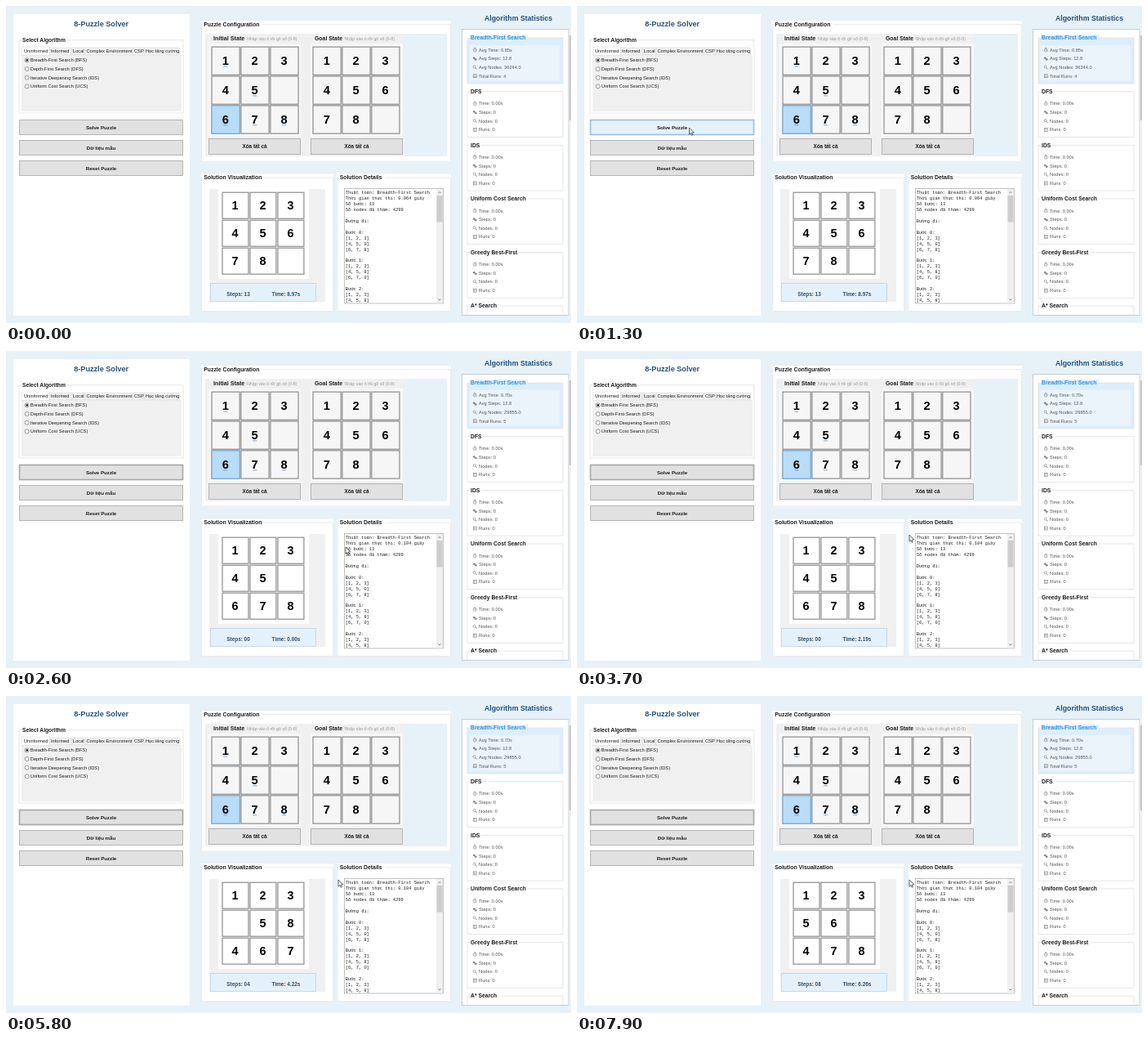
Write an HTML page that moves like this. It is 692 px wide and 388 px high and loops after 8000 ms.

```html
<!DOCTYPE html>
<html lang="vi">
<head>
<meta charset="utf-8">
<title>8-Puzzle Solver</title>
<style>
html, body { margin: 0; width: 100%; height: 100%; overflow: hidden; background: #e6f1f8; }
svg { display: block; width: 100%; height: 100%; }
text { font-family: "Liberation Sans", Arial, sans-serif; white-space: pre; }
.mono { font-family: "Liberation Mono", monospace; }
</style>
</head>
<body>
<svg id="stage" viewBox="0 0 692 388"></svg>
<script>
const LOOP = 8000;
const stage = document.getElementById('stage');
const PALE = '#e6f1f8', GREY = '#f0f0f0', NAVY = '#24507c', INK = '#1c1c1c';

function add(tag, attrs, parent = stage) {
  const el = document.createElementNS('http://www.w3.org/2000/svg', tag);
  set(el, attrs);
  parent.appendChild(el);
  return el;
}
function set(el, attrs) {
  for (const k in attrs) el.setAttribute(k, attrs[k]);
}
function rect(x, y, r, b, fill, stroke = 'none', w = 1, parent = stage) {
  return add('rect', { x, y, width: r - x, height: b - y, fill, stroke, 'stroke-width': w }, parent);
}
function label(str, x, y, size, fill = INK, more = {}) {
  const el = add('text', { x, y, 'font-size': size, fill, ...more });
  el.textContent = str;
  return el;
}
const bold = { 'font-weight': 700 };
const mid = { 'text-anchor': 'middle' };
const boldMid = { ...bold, ...mid };

// Group box with a title that interrupts its top border
function group(title, x, y, r, b, size, titleW, color = INK, fill = '#fff') {
  rect(x, y, r, b, fill, '#dcdcdc', .7);
  rect(x + 3, y - 4, x + 5 + titleW, y + 4, fill);
  label(title, x + 4, y + 2.3, size, color, bold);
}

// White panel whose border line runs at mid-height of the title
function panel(title, x, y, r, b, titleW) {
  rect(x, y, r, b, '#fff');
  rect(x + .5, y + 4.5, r - .5, b - .5, 'none', '#e4e7e9', .8);
  rect(x + 2, y, x + 5 + titleW, y + 8, '#fff');
  label(title, x + 3.2, y + 6.6, 6.87, INK, bold);
}

function grid(xs, ys, side, size, fill, digits) {
  const h = side / 2;
  return digits.map((d, i) => {
    const x = xs[i % 3], y = ys[i / 3 | 0];
    rect(x + .4 - h, y - h, x + .4 + h, y + h, fill, '#8d8d8d', 1.2);
    return label(d || '', x, y + size * .35, size, '#000', boldMid);
  });
}

function button(str, x, y, r, b, size = 6.15) {
  const box = rect(x, y, r, b, '#e1e1e1', '#b4b4b4', 1);
  label(str, (x + r) / 2, (y + b) / 2 + 2.2, size, INK, boldMid);
  return box;
}

// Left panel
rect(9, 10, 225, 379, '#fff');
label('8-Puzzle Solver', 116.7, 25.4, 9.15, NAVY, boldMid);
group('Select Algorithm', 16, 41.8, 217, 131, 6.7, 54);
rect(19, 60, 215, 129, GREY);
rect(19.5, 50, 53.5, 60.5, '#fff', '#d9d9d9', .6);
const tabs = [['Uninformed', 22, 52], ['Informed', 55, 78.5], ['Local', 82, 95.5],
  ['Complex Environment', 98.5, 153.5], ['CSP', 157, 167.5], ['Học tăng cường', 171, 211]];
tabs.forEach(([t, x, r], i) => {
  if (i) rect(x - 1.5, 51, r + 1.5, 60, GREY, '#d9d9d9', .6);
  label(t, x, 57.3, 5.7);
});
['Breadth-First Search (BFS)', 'Depth-First Search (DFS)', 'Iterative Deepening Search (IDS)',
  'Uniform Cost Search (UCS)'].forEach((t, i) => {
  const y = 66.4 + i * 10.65;
  add('circle', { cx: 25.7, cy: y, r: 2.5, fill: '#fff', stroke: '#555', 'stroke-width': .6 });
  if (!i) add('circle', { cx: 25.7, cy: y, r: 1.3, fill: '#222' });
  label(t, 29.8, y + 2, 5.72);
});
const solveBtn = button('Solve Puzzle', 16.5, 139.5, 216.5, 157.5);
const sampleBtn = button('Dữ liệu mẫu', 16.5, 164.5, 216.5, 182.5);
button('Reset Puzzle', 16.5, 189.5, 216.5, 207.5);

// Puzzle configuration
panel('Puzzle Configuration', 239, 18, 545, 190.5, 70);
rect(244, 34, 540, 184, PALE);
rect(244, 34, 486, 184, GREY);
[['Initial State', 254, 295, 248], ['Goal State', 378, 414.5, 373]].forEach(([t, x, hintX, left]) => {
  rect(left, 46, left + 113, 160, '#f7f7f7');
  label(t, x, 41.7, x < 300 ? 7.2 : 6.9, INK, bold);
  label('Nhập vào ô rồi gõ số (0-8)', hintX, 41.8, 5.3, '#9a9a9a');
  button('Xóa tất cả', left + .5, 162.5, left + 112.5, 181.5, 6.4);
});
const rows = [67.2, 103.1, 139], initX = [268.7, 304.6, 340.6];
grid(initX, rows, 34.2, 14.6, '#f6f6f6', [1, 2, 3, 4, 5, 0, 6, 7, 8]);
grid([392.7, 428.6, 464.5], rows, 34.2, 14.6, '#f6f6f6', [1, 2, 3, 4, 5, 6, 7, 8, 0]);
rect(252, 121.9, 286.2, 156.1, '#b9dcf8', '#78aedb', 1.2);
label('6', initX[0], 144.1, 14.6, '#000', boldMid);
[[0, 0], [1, 1], [0, 2], [1, 2], [2, 2]].forEach(([c, r]) =>
  rect(initX[c] - 2.5, rows[r] + 6.4, initX[c] + 2.5, rows[r] + 7.2, '#5b9bd5'));

// Solution visualization
panel('Solution Visualization', 239, 205.5, 401, 374, 72);
rect(249, 224, 391, 362, GREY);
rect(260, 224, 371, 334, '#fff');
const tiles = grid([280.6, 314.5, 348.5], [244.2, 278.2, 312.2], 32, 14.4, '#fff', Array(9).fill(0));
rect(250.5, 339.5, 379.5, 361.5, '#e2f1fc', '#bdd3e5', .8);
rect(268, 347, 302, 358.5, '#eaf0f4');
rect(324, 347, 363, 358.5, '#eaf0f4');
const stepText = label('', 270.3, 354.9, 6.4, NAVY, bold);
const timeText = label('', 325.6, 354.9, 6.4, NAVY, bold);

// Solution details
panel('Solution Details', 405.5, 205.5, 545, 374, 54);
rect(414.5, 223.5, 535.5, 364, '#fff', '#a5a5a5', .7);
rect(527, 224, 535, 363.6, GREY);
rect(527.5, 232, 534.5, 264.5, '#cdcdcd');
for (const [y, d] of [[229, -1.6], [358.5, 1.6]])
  add('path', { d: `M529.4 ${y} l1.6 ${d} l1.6 ${-d}`, fill: 'none', stroke: '#666', 'stroke-width': .8 });
const log = ['Thuật toán: Breadth-First Search', '', 'Số bước: 13', 'Số nodes đã thăm: 4299', '', 'Đường đi:', '',
  'Bước 0:', '[1, 2, 3]', '[4, 5, 0]', '[6, 7, 8]', '', 'Bước 1:', '[1, 2, 3]', '[4, 5, 8]', '[6, 7, 0]', '',
  'Bước 2:', '[1, 2, 3]', '[4, 5, 8]'];
const logLines = log.map((t, i) => label(t, 415.8, 230.3 + i * 6.92, 5.38, INK, { class: 'mono' }));

// Statistics
label('Algorithm Statistics', 627.5, 18.4, 8.8, NAVY, boldMid);
rect(558.5, 28.5, 689, 378.5, '#fff', '#bcc4ca', .8);
rect(689.6, 28, 692, 379, GREY);
rect(689.8, 36, 692, 140, '#c8c8c8');
const clip = add('clipPath', { id: 'list' });
rect(558, 28, 690, 378, '#fff', 'none', 0, clip);

function icon(kind, x, y) {
  const g = add('g', { fill: 'none', stroke: '#777', 'stroke-width': .6 });
  if (kind === 0) {
    add('circle', { cx: x, cy: y + .3, r: 2 }, g);
    add('path', { d: `M${x} ${y - 1} v1.4 h1 M${x - .8} ${y - 2.4} h1.6` }, g);
  } else if (kind === 1) {
    add('ellipse', { cx: x - 1, cy: y - .6, rx: 1.2, ry: .9, fill: '#888' }, g);
    add('ellipse', { cx: x + 1, cy: y + 1.1, rx: 1.2, ry: .9, fill: '#888' }, g);
  } else if (kind === 2) {
    add('circle', { cx: x - .6, cy: y - .6, r: 1.5 }, g);
    add('path', { d: `M${x + .5} ${y + .5} l1.8 1.8`, 'stroke-width': .9 }, g);
  } else {
    rect(x - 2, y - 1.9, x + 2, y + 2.1, 'none', '#777', .6, g);
    add('path', { d: `M${x - 1} ${y - .6} h2 M${x - 1} ${y + .8} h2` }, g);
  }
}

const bfsLines = [];
[['Breadth-First Search', 69], ['DFS', 14], ['IDS', 12], ['Uniform Cost Search', 68], ['Greedy Best-First', 58]]
  .forEach(([t, w], i) => {
    const y = 39.1 + i * 65.6;
    group(t, 565, y, 682, y + 55.8, 6.83, w, i ? INK : '#2d8fe0', i ? '#fff' : '#dceefb');
    if (!i) rect(567.5, 48, 678, 91.5, '#ebf4fb');
    ['Time: 0.00s', 'Steps: 0', 'Nodes: 0', 'Runs: 0'].forEach((s, k) => {
      const ly = y + 14.6 + k * 10.65;
      icon(k, 574.3, ly);
      const line = label(s, 579, ly + 2, 5.72, '#555');
      if (!i) bfsLines.push(line);
    });
  });
const last = add('g', { 'clip-path': 'url(#list)' });
rect(565, 367.1, 682, 423, '#fff', '#dcdcdc', .7, last);
rect(568, 363, 604, 371, '#fff');
label('A* Search', 569, 369.2, 6.83, INK, bold);

const cursor = add('path', {
  d: 'M0 0 V8.2 L1.9 6.5 L3.2 9.3 L4.5 8.7 L3.2 6 L5.8 5.9 Z',
  fill: '#fff', stroke: '#222', 'stroke-width': .7
});

// Pointer keys: time, x, y
const pointer = [[100, 430, 262], [500, 245, 205], [900, 123, 169], [1000, 123, 169], [1250, 137.5, 149],
  [2000, 137.5, 149], [2400, 320, 205], [2600, 416, 240], [2800, 407, 225], [LOOP, 407, 225]];
const ease = p => p * p * (3 - 2 * p);
function pointerAt(t) {
  const i = Math.max(1, pointer.findIndex(k => k[0] >= t));
  const [a, b] = [pointer[i - 1], pointer[i]];
  const p = ease(Math.max(0, Math.min(1, (t - a[0]) / (b[0] - a[0]))));
  return [a[1] + (b[1] - a[1]) * p, a[2] + (b[2] - a[2]) * p];
}

// Board after each move of the blank
const boards = [[1, 2, 3, 4, 5, 0, 6, 7, 8]];
for (const d of [3, -1, -1, -3, 1, 3, 1, -3]) {
  const b = boards[boards.length - 1].slice(), z = b.indexOf(0);
  b[z] = b[z + d];
  b[z + d] = 0;
  boards.push(b);
}
const solved = [1, 2, 3, 4, 5, 6, 7, 8, 0];
const moves = [4200, 4800, 5300, 5800, 6300, 6800, 7300, 7800];
const RUN = 1600, RESET = 2300, TICK = 3700;

function paint(t) {
  const started = t >= RESET, done = t >= RUN;
  const n = moves.filter(m => t >= m).length;
  const board = started ? boards[n] : solved;
  tiles.forEach((el, i) => { el.textContent = board[i] || ''; });
  stepText.textContent = 'Steps: ' + (started ? String(n).padStart(2, '0') : '13');
  const secs = !started ? 8.97 : t < TICK ? 0 : 2.19 + n * .5085;
  timeText.textContent = `Time: ${secs.toFixed(2)}s`;

  logLines[1].textContent = `Thời gian thực thi: ${done ? '0.104' : '0.064'} giây`;
  const stats = done ? ['0.70s', '12.8', '29855.0', '5'] : ['0.85s', '12.8', '36244.0', '4'];
  ['Avg Time', 'Avg Steps', 'Avg Nodes', 'Total Runs'].forEach((s, i) => {
    bfsLines[i].textContent = `${s}: ${stats[i]}`;
  });

  const [x, y] = pointerAt(t);
  set(cursor, { transform: `translate(${x} ${y})`, visibility: t < 100 ? 'hidden' : 'visible' });
  const over = (top, bottom) => t >= 100 && x > 16 && x < 217 && y > top && y < bottom;
  const enabled = t >= 500 && !(t >= RUN && t < RESET);
  const hot = enabled && over(139, 158);
  const down = hot && t >= 1400 && t < RUN;
  set(solveBtn, {
    fill: down ? '#cce4f7' : hot ? '#e5f1fb' : '#e1e1e1',
    stroke: hot ? '#9dbfe0' : enabled ? '#a9a9a9' : '#b4b4b4',
    'stroke-width': enabled ? 1.7 : 1
  });
  const hot2 = over(164, 183);
  set(sampleBtn, { fill: hot2 ? '#e5f1fb' : '#e1e1e1', stroke: hot2 ? '#8fb6df' : '#b4b4b4' });
}

function frame() {
  paint(performance.now() % LOOP);
  requestAnimationFrame(frame);
}
frame();
</script>
</body>
</html>
```
